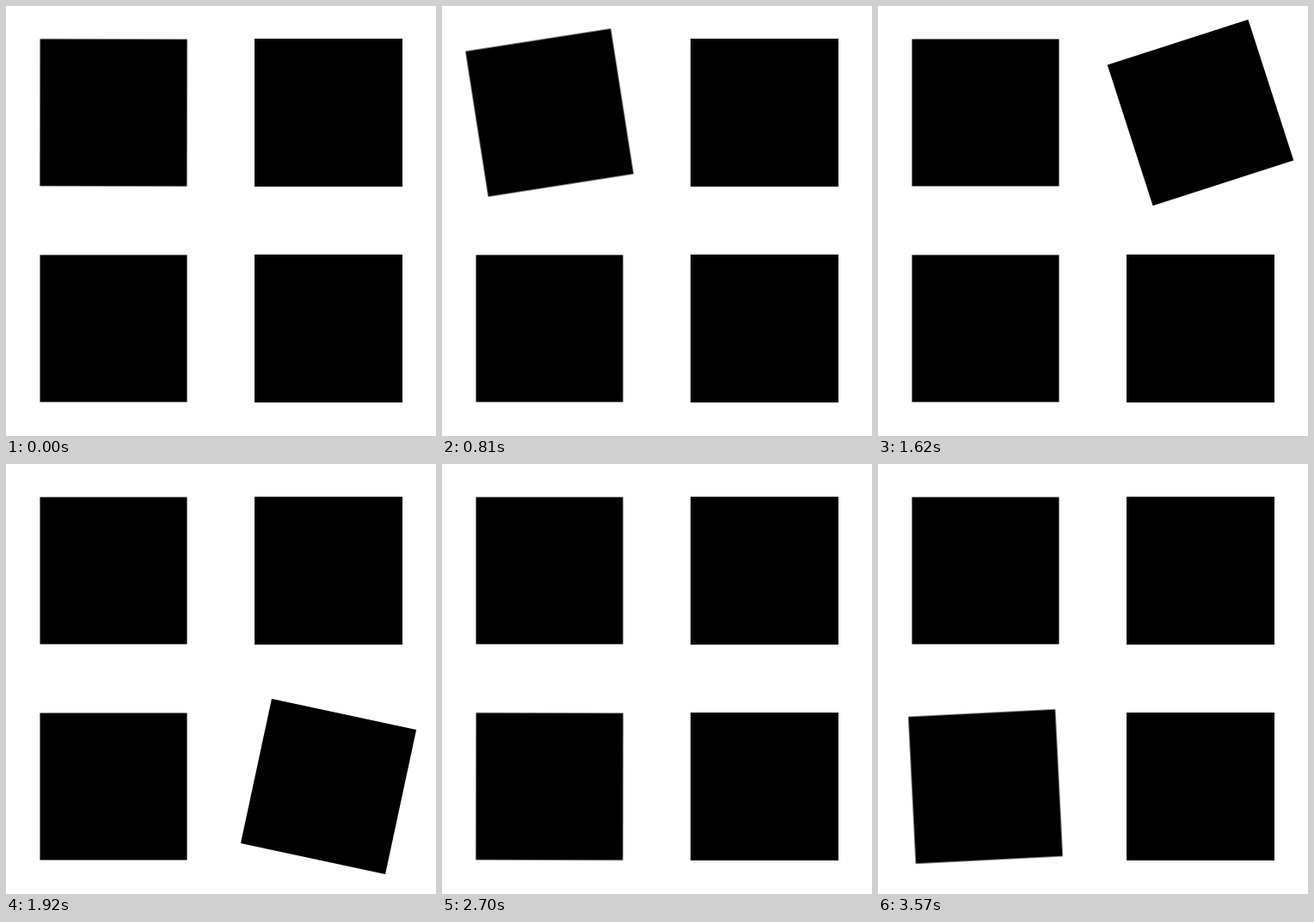
Write an HTML page that moves like this. It is 500 px wide and 500 px high and loops after 3.6 s.

```html
<!DOCTYPE html>
<html lang="en">
<head>
<meta charset="utf-8">
<title>Turning squares</title>
<style>
  html, body {
    margin: 0;
    width: 100%;
    height: 100%;
    overflow: hidden;
    background: #fff;
  }
  svg {
    display: block;
    width: 100%;
    height: 100%;
  }
  rect {
    transform-box: fill-box;
    transform-origin: center;
    animation: turn 3.6s linear calc(var(--order) * 0.9s) infinite;
  }
  /* Each square makes a quarter turn, then rests for the other three. */
  @keyframes turn {
    0% { transform: rotate(0deg); }
    25%, 100% { transform: rotate(90deg); }
  }
</style>
</head>
<body>
<svg viewBox="0 0 500 500">
  <rect style="--order: 0" x="39.5" y="38.5" width="171" height="171"/>
  <rect style="--order: 1" x="289" y="38" width="172" height="172"/>
  <rect style="--order: 2" x="289" y="289" width="172" height="172"/>
  <rect style="--order: 3" x="39.5" y="289.5" width="171" height="171"/>
</svg>
</body>
</html>
```
